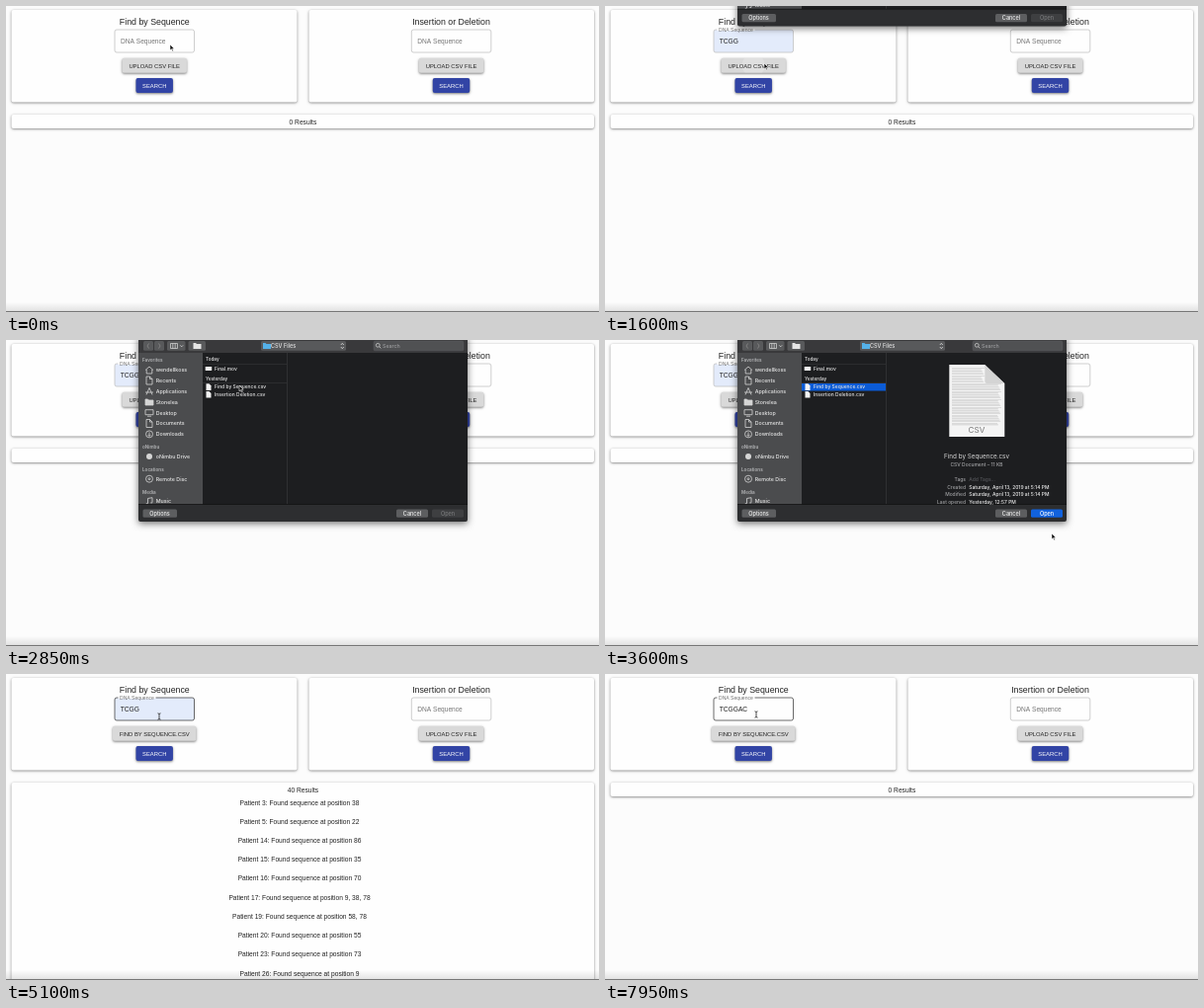
Recreate the animation shown at these times as an HTML page with a canvas. Size 600x310 px, loop 8000 ms.

```html
<!DOCTYPE html>
<html lang="en">
<head>
<meta charset="utf-8">
<title>Sequence search</title>
<style>
html, body { margin: 0; width: 600px; height: 310px; overflow: hidden; background: #fcfcfc; }
canvas { display: block; }
</style>
</head>
<body>
<canvas id="stage" width="600" height="310"></canvas>
<script>
const ctx = document.getElementById('stage').getContext('2d');
const LOOP = 8000;
const PAGE_FONT = '"Liberation Sans", Arial, sans-serif';
const SYSTEM_FONT = 'Inter, sans-serif';
const BLUE = '#3244a5', CARD = '#fefefe', INK = '#222';

const suggestions = ['TCTCCGCTTCTAATAGCACACACCGGGCAATACGAGCTCAAGCCAGT…', 'TCGG', 'TCGAC', 'ACGC', 'TCATAA', 'T'];
const matches = ['3: 38', '5: 22', '14: 86', '15: 35', '16: 70', '17: 9, 38, 78', '19: 58, 78', '20: 55', '23: 73', '26: 9'];

// Pointer path: time, x, y
const path = [
  [0, 166, 39], [400, 166, 39], [550, 158, 46], [900, 135, 70], [1150, 135, 70],
  [1380, 150, 60], [1550, 151, 60], [1800, 244, 41], [2050, 244, 41], [2350, 243, 66],
  [2750, 236, 46], [3000, 236, 46], [3500, 452, 196], [3720, 452, 196], [3920, 446, 175],
  [4080, 446, 175], [4480, 150, 79], [4720, 150, 79], [5050, 155, 43], [6180, 155, 43],
  [6300, 155, 76], [6450, 155, 76], [6620, 157, 79], [7300, 157, 79], [7850, 153, 41], [LOOP, 153, 41]
];

const clamp = v => Math.max(0, Math.min(1, v));
const ease = v => v * v * (3 - 2 * v);
const ramp = (t, start, end) => ease(clamp((t - start) / (end - start)));
const between = (t, start, end) => t >= start && t < end;
const inside = (p, x, y, w, h) => p.x >= x && p.x <= x + w && p.y >= y && p.y <= y + h;

function pointerAt(t) {
  const i = path.findIndex(key => key[0] > t);
  const [t0, x0, y0] = path[i - 1], [t1, x1, y1] = path[i];
  const k = ramp(t, t0, t1);
  return { x: x0 + (x1 - x0) * k, y: y0 + (y1 - y0) * k };
}

// y is the middle of the capitals
function text(str, x, y, size, color = INK, align = 'left', font = PAGE_FONT, weight = 400) {
  ctx.font = `${weight} ${size}px ${font}`;
  ctx.textAlign = align;
  ctx.fillStyle = color;
  ctx.fillText(str, x, y + size * 0.36);
}

const system = (str, x, y, size, color = '#e6e6e6', align = 'left', weight = 500) =>
  text(str, x, y, size, color, align, SYSTEM_FONT, weight);

function box(x, y, w, h, fill, r = 0, stroke, line = 0.7) {
  ctx.beginPath();
  ctx.roundRect(x, y, w, h, r);
  if (fill) { ctx.fillStyle = fill; ctx.fill(); }
  if (stroke) { ctx.strokeStyle = stroke; ctx.lineWidth = line; ctx.stroke(); }
}

function shadowed(blur, dy, alpha, draw) {
  ctx.save();
  ctx.shadowColor = `rgba(0,0,0,${alpha})`;
  ctx.shadowBlur = blur;
  ctx.shadowOffsetY = dy;
  draw();
  ctx.restore();
}

const card = (x, y, w, h) => shadowed(2.5, 0.8, 0.5, () => box(x, y, w, h, CARD, 2));

function shape(d, x, y, fill, stroke, line = 0.8) {
  const p = new Path2D(d);
  ctx.save();
  ctx.translate(x, y);
  if (fill) { ctx.fillStyle = fill; ctx.fill(p); }
  if (stroke) { ctx.strokeStyle = stroke; ctx.lineWidth = line; ctx.stroke(p); }
  ctx.restore();
}

function button(label, cx, y, w, fill, color, rippleAge = -1) {
  shadowed(2.5, 1, 0.5, () => box(cx - w / 2, y, w, 15, fill, 2));
  if (between(rippleAge, 0, 400)) {
    ctx.save();
    ctx.beginPath();
    ctx.rect(cx - w / 2, y, w, 15);
    ctx.clip();
    ctx.beginPath();
    ctx.arc(cx, y + 7.5, 4 + rippleAge / 20, 0, 7);
    ctx.fillStyle = `rgba(255,255,255,${0.3 * (1 - rippleAge / 400)})`;
    ctx.fill();
    ctx.restore();
  }
  text(label, cx, y + 7.7, 5.85, color, 'center');
}

function field(x, { value = '', lift = 0, focused, hovered, filled, caret } = {}) {
  const border = focused ? BLUE : hovered ? '#444' : '#c2c2c2';
  box(x, 24, 80.5, 23, filled ? '#e3ebfb' : CARD, 2, border, focused ? 1.3 : 0.8);
  if (lift > 0) box(x + 3.5, 23, 38 * lift, 2, CARD);
  text('DNA Sequence', x + 6 - lift, 35.6 - 11.6 * lift, 6.6 - 1.55 * lift, focused ? BLUE : '#757575');
  ctx.save();
  ctx.beginPath();
  ctx.rect(x + 4, 26, 73, 20);
  ctx.clip();
  text(value, x + 5.7, 35.3, 6.66);
  if (caret) box(x + 6.2 + ctx.measureText(value).width, 31, 0.7, 8, INK);
  ctx.restore();
}

function drawPage(t, pointer) {
  box(0, 0, 600, 310, '#fcfcfc');
  card(5.5, 4, 289, 93.5);
  card(306.5, 4, 288.5, 93.5);
  text('Find by Sequence', 150.3, 16, 8.8, INK, 'center');
  text('Insertion or Deletion', 450.5, 16, 8.8, INK, 'center');

  const listOpen = between(t, 400, 1150);
  const row = listOpen ? Math.floor((pointer.y - 51) / 15) : -1;
  const value = t < 1150 ? suggestions[row] || ''
    : t < 6000 ? 'TCGG' : t < 6120 ? 'TCGGA' : 'TCGGAC';
  const focused = between(t, 300, 1450) || between(t, 5350, 6750);
  const blinkStart = t < 5350 ? 300 : t < 6000 ? 5350 : 6120;
  field(110, {
    value, focused,
    lift: ramp(t, 300, 500),
    hovered: t > 4500 && inside(pointer, 110, 24, 80, 23),
    filled: value && t < 6000,
    caret: focused && t > 5300 && (t - blinkStart) % 1000 < 500 && t < 6450
  });
  field(410.3);

  const chosen = t >= 4250;
  button(chosen ? 'FIND BY SEQUENCE.CSV' : 'UPLOAD CSV FILE', 150.2, 52.7, chosen ? 84.5 : 65.5, '#d9d9d9', INK, t - 1450);
  button('UPLOAD CSV FILE', 450.5, 52.7, 65.5, '#d9d9d9', INK);
  button('SEARCH', 150.2, 73, 37.5, BLUE, '#fff', t < 6000 ? t - 4600 : t - 6750);
  button('SEARCH', 450.5, 73, 37.5, BLUE, '#fff');

  const found = between(t, 4700, 6850);
  card(5.5, 110, 589.5, found ? 230 : 14);
  text(found ? '40 Results' : '0 Results', 300.4, 117.3, 6.66, INK, 'center');
  if (found) matches.forEach((match, i) => {
    const [patient, position] = match.split(': ');
    text(`Patient ${patient}: Found sequence at position ${position}`, 297, 130.2 + i * 19.22, 6.66, INK, 'center');
  });

  if (listOpen) drawSuggestions(row);

  const fade = ctx.createLinearGradient(0, 300, 0, 309);
  fade.addColorStop(0, 'rgba(0,0,0,0)');
  fade.addColorStop(1, 'rgba(0,0,0,.1)');
  box(0, 300, 600, 9, fade);
  box(0, 309, 600, 1, '#777');
}

function drawSuggestions(row) {
  shadowed(3, 1, 0.4, () => box(109.3, 48, 190.3, 96.5, '#202124', 2));
  if (row >= 0) box(109.3, 66 - 15 + row * 15, 190.3, 15, '#3b3c3f');
  suggestions.forEach((item, i) => text(item, 114.5, 58.7 + i * 15, 5.33, '#f1f1f1'));
}

const FOLDER = 'M0 1h2.5l1 1H8v5H0z';
const SHEET = 'M1 0h3.5L7 2.5V8H1zM4.5 0v2.5H7';
const sidebar = [
  ['Favorites', 20.5],
  ['wendellkoss', 30.5, 'M0 4L4 .5 8 4M1.2 3.5V7.5H6.8V3.5'],
  ['Recents', 41, SHEET],
  ['Applications', 52, 'M1 7.5L4 .5l3 7M0 5h8'],
  ['Stonelea', 63, FOLDER],
  ['Desktop', 73.7, 'M0 1h8v5H0zM2 7.5h4'],
  ['Documents', 84.5, SHEET],
  ['Downloads', 95.4, 'M.5 4a3.5 3.5 0 1 0 7 0a3.5 3.5 0 1 0-7 0M4 2v4M2.5 4.5L4 6l1.5-1.5'],
  ['oNimbu', 108.5],
  ['oNimbu Drive', 118, 'dot'],
  ['Locations', 131.2],
  ['Remote Disc', 140.7, 'M.5 4a3.5 3.5 0 1 0 7 0a3.5 3.5 0 1 0-7 0M3 4a1 1 0 1 0 2 0a1 1 0 1 0-2 0'],
  ['Media', 154],
  ['Music', 163, 'M2.5 6.5V1.5L7 .7V5.7M.8 6.7h1.7M5.3 5.9H7']
];

function drawDialog(selected) {
  shadowed(7, 2, 0.55, () => box(134, -4, 333, 188, '#2d2e30', 2));
  box(134, -4, 333, 17, '#39393b');
  box(134, 13, 65, 153.5, '#4b4c4e');
  box(199, 13, 268, 153.5, '#1d1e20');
  box(284, 13, 0.7, 153.5, '#38393b');
  box(134, 166.3, 333, 0.7, '#111');

  // Toolbar
  for (const [x, w] of [[139, 10], [150, 10], [163, 18.5], [184.5, 17.5], [258, 86]]) box(x, 1, w, 9.8, '#58595b', 1.5);
  shape('M1.5 0L0 2.5 1.5 5', 143, 3.5, null, '#8a8a8a');
  shape('M0 0L1.5 2.5 0 5', 154.5, 3.5, null, '#8a8a8a');
  shape('M0 0h7v5H0zM2.3 0v5M4.7 0v5', 166.5, 3.5, null, '#ddd', 0.7);
  shape('M0 0l1.4 1.4L2.8 0', 176.3, 5.4, null, '#ddd');
  shape(FOLDER, 189.5, 2, '#e5e5e5');
  shape(FOLDER, 260, 2, '#55b1e8');
  system('CSV Files', 268, 6, 5.5);
  shape('M0 2L1.5 .3 3 2M0 4l1.5 1.7L3 4', 338.8, 3, null, '#ddd');
  box(372, 1, 91, 9.8, '#505153', 1.5, '#626365', 0.4);
  shape('M4.2 2.3a1.9 1.9 0 1 0-3.8 0a1.9 1.9 0 1 0 3.8 0M3.7 3.7L5.4 5.4', 374, 3, null, '#ccc');
  system('Search', 381, 6, 5.3, '#9c9d9f');

  // Sidebar
  ctx.save();
  ctx.beginPath();
  ctx.rect(134, 13, 65, 153.3);
  ctx.clip();
  for (const [label, y, icon] of sidebar) {
    if (!icon) { system(label, 138, y, 4.6, '#b4b5b7', 'left', 600); continue; }
    if (icon === 'dot') box(142, y - 3, 6, 6, '#d5d5d5', 3);
    else shape(icon, 141, y - 4, icon === FOLDER ? '#d5d5d5' : null, '#d5d5d5');
    system(label, 151.7, y, 5.3);
  }
  ctx.restore();

  // File list
  system('Today', 202, 19.5, 4.6, '#d5d5d5', 'left', 600);
  system('Yesterday', 202, 39, 4.6, '#d5d5d5', 'left', 600);
  box(199, 24, 85, 0.5, '#3c3d3f');
  box(199, 43.5, 85, 0.5, '#3c3d3f');
  if (selected) box(199, 44, 85, 7.6, '#0b5bd6');
  box(201.7, 27, 6.5, 4, '#f0f0f0', 0.5);
  system('Final.mov', 211, 29.2, 4.95);
  for (const [name, y] of [['Find by Sequence.csv', 47.7], ['Insertion Deletion.csv', 55.4]]) {
    shape('M0 0h3l2 2v4.6H0z', 202.5, y - 3.4, '#f3f3f3');
    system(name, 211, y, 4.95);
  }

  if (selected) drawPreview();

  // Bottom bar
  box(138.5, 171.5, 34.5, 8.2, '#5d5e60', 1.5);
  box(395, 171.5, 32, 8.2, '#5d5e60', 1.5);
  box(431, 171.5, 32, 8.2, selected ? '#1162de' : '#3e3f41', 1.5);
  system('Options', 155.5, 175.8, 5.5, '#eee', 'center');
  system('Cancel', 411, 175.8, 5.5, '#eee', 'center');
  system('Open', 447, 175.8, 5.5, selected ? '#fff' : '#77787a', 'center');
}

function drawPreview() {
  shape('M0 0h36l20 19v54H0z', 348.3, 25, '#f4f4f4');
  for (let y = 28; y < 86; y += 1.6) {
    const width = y < 44 ? 33 : 50;
    box(351, y, width - (y * 7 % 4), 0.6, '#c3c3c3');
  }
  shape('M0 0v17q0 2 2 2h18z', 384.3, 25, '#d4d4d4');
  system('CSV', 376, 91.3, 8.2, '#777', 'center', 400);
  system('Find by Sequence.csv', 376, 117.3, 6.3, '#d8d8d8', 'center', 400);
  system('CSV Document – 11 KB', 376, 126.3, 4.95, '#a5a6a8', 'center');
  const details = [
    ['Tags', 'Add Tags…'], ['Created', 'Saturday, April 13, 2019 at 5:14 PM'],
    ['Modified', 'Saturday, April 13, 2019 at 5:14 PM'], ['Last opened', 'Yesterday, 12:57 PM']
  ];
  details.forEach(([label, value], i) => {
    const y = 141.5 + i * 7.5;
    system(label, 365, y, 4.95, '#a0a1a3', 'right');
    system(value, 368.3, y, 4.95, i ? '#eee' : '#55565a');
  });
}

function drawPointer(t, { x, y }, dialogOpen) {
  const p = { x, y };
  const free = !dialogOpen && t > 250 && !between(t, 400, 1150);
  if (free && inside(p, 110, 24, 80, 23)) {
    if (between(t, 5400, 6180)) return;
    shape('M-1.5-3.2Q0-3.2 0-2.2V2.2Q0 3.2-1.5 3.2M1.5-3.2Q0-3.2 0-2.2M0 2.2Q0 3.2 1.5 3.2', x, y, null, '#222');
  } else if (free && (inside(p, 118, 53, 65, 15) || inside(p, 131, 73, 38, 15))) {
    shape('M-.8-2.2Q0-3.2.6-2.2V0l2.4.6q.8.4.4 1.6L2.8 4H-.8L-2.7 1.2Q-2.6.4-.8 1.2z', x, y, '#fff', '#222', 0.5);
  } else {
    shape('M0 0V5.8L1.4 4.6 2.3 6.8 3.3 6.4 2.4 4.2H4.2z', x, y, '#000', '#fff', 0.6);
  }
}

function draw(now) {
  const t = now % LOOP;
  const pointer = pointerAt(t);
  const open = ramp(t, 1550, 1750) - ramp(t, 4050, 4250);
  drawPage(t, pointer);
  if (open > 0) {
    ctx.save();
    ctx.translate(0, -195 * (1 - open));
    drawDialog(t >= 2880);
    ctx.restore();
  }
  drawPointer(t, pointer, open > 0);
  requestAnimationFrame(draw);
}
requestAnimationFrame(draw);
</script>
</body>
</html>
```
